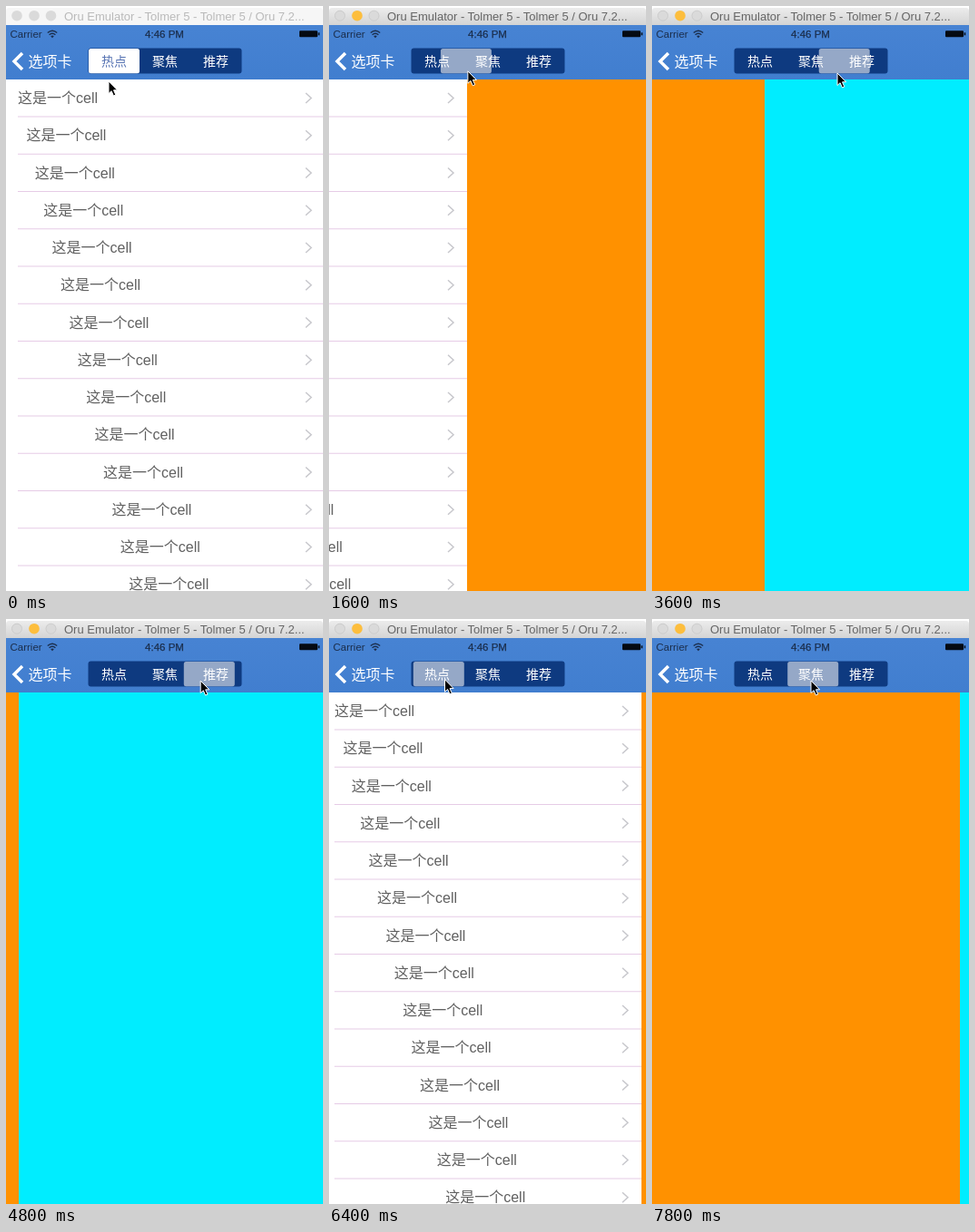
An HTML page that plays this animation: 349 px wide and 645 px high, repeating every 8000 ms.

```html
<!DOCTYPE html>
<html lang="zh-CN">
<head>
<meta charset="utf-8">
<title>选项卡</title>
<style>
  html, body { margin: 0; width: 100%; height: 100%; overflow: hidden; background: #fff; }
  svg { display: block; width: 349px; height: 645px; }
  text { font-family: "Liberation Sans", "Noto Sans CJK SC", "Noto Sans CJK", sans-serif; }
  .cell { font-size: 16px; fill: #616161; font-weight: 300; }
  .tab { font-size: 14px; font-weight: 500; fill: #fff; text-anchor: middle; }
  .title { font-size: 13px; fill: #666; }
  .status { font-size: 11.5px; fill: #1b2e4c; }
  .idle .active { display: none; }
  .idle .title { fill: #bababa; }
  .idle .tab.first { fill: #5a76b4; font-weight: 400; }
  .idle #thumb { fill-opacity: 1; }
</style>
</head>
<body>
<svg id="stage" viewBox="0 0 349 645">
  <defs>
    <linearGradient id="bar" x2="0" y2="1">
      <stop offset="0" stop-color="#ececec"/><stop offset="1" stop-color="#d4d4d4"/>
    </linearGradient>
    <linearGradient id="nav" x2="0" y2="1">
      <stop offset="0" stop-color="#4783d3"/><stop offset="1" stop-color="#417ecf"/>
    </linearGradient>
  </defs>

  <g id="pages">
    <rect y="81" width="351" height="564" fill="#fff"/>
    <g id="rows"></g>
    <rect x="351" y="81" width="351" height="564" fill="#ff9100"/>
    <rect x="702" y="81" width="351" height="564" fill="#00edff"/>
  </g>

  <rect width="349" height="21" fill="#fff"/>
  <path d="M0 21V6q0-4 4-4H345q4 0 4 4V21z" fill="#f6f6f6"/>
  <path class="active" d="M0 21V6q0-4 4-4H345q4 0 4 4V21z" fill="url(#bar)"/>
  <g fill="#dadada">
    <circle cx="12" cy="10.7" r="5.8"/>
    <circle cx="31" cy="10.7" r="5.8"/>
    <circle cx="49.5" cy="10.7" r="5.8"/>
  </g>
  <g class="active">
    <g fill="none" stroke="#c8c8c8" stroke-width=".8">
      <circle cx="12" cy="10.7" r="5.5"/><circle cx="49.5" cy="10.7" r="5.5"/>
    </g>
    <circle cx="31" cy="10.7" r="5.8" fill="#fdbe3d"/>
  </g>
  <text class="title" x="64" y="15.5">Oru Emulator - Tolmer 5 - Tolmer 5 / Oru 7.2...</text>

  <rect y="21" width="349" height="60" fill="url(#nav)"/>
  <text class="status" x="4.5" y="34.7">Carrier</text>
  <g fill="none" stroke="#1b2e4c" stroke-width="1.4">
    <path d="M45.8 29.5q5.2-4.6 10.4 0M47.6 31.7q3.4-3 6.8 0"/>
    <path d="M49.2 33.2L51 35.2 52.8 33.2Q51 31.8 49.2 33.2z" fill="#1b2e4c" stroke="none"/>
  </g>
  <text class="status" x="174.5" y="34.7" text-anchor="middle" stroke="#1b2e4c" stroke-width=".25">4:46 PM</text>
  <rect x="323" y="27.3" width="20" height="7" rx="1" fill="#050a12"/>
  <rect x="343.7" y="29.3" width="1.5" height="3" fill="#050a12"/>

  <path d="M18 52L9 61 18 70" fill="none" stroke="#fff" stroke-width="3.5"/>
  <text x="24.5" y="66.5" font-size="16" fill="#fff">选项卡</text>

  <rect x="90.5" y="46.5" width="169" height="28" rx="3" fill="#0e3a80"/>
  <rect id="thumb" y="47" width="56" height="27.3" rx="2.5" fill="#fff" fill-opacity=".56"/>
  <text class="tab first" x="119" y="66">热点</text>
  <text class="tab" x="175" y="66">聚焦</text>
  <text class="tab" x="231" y="66">推荐</text>

  <path id="cursor" d="M0 0V13.5L3.1 10.7 5.4 16 7.8 15 5.5 9.8H9.6z" fill="#000" stroke="#fff"/>
</svg>
<script>
const LOOP = 8000, STEP = 200;   // the picture updates five times a second
const PAGE = 351, TAB = 56.3;
const LEAD = 90;                 // ms by which the dragged thumb runs ahead of the page
const ROWS = 14, PITCH = 41.25, INDENT = 9.4;

// [time, scroll in px]: rests and turning points of the drag
const drag = [
  [1080, 0], [1600, 199], [1800, 199], [2890, 351], [3000, 462], [3600, 578],
  [3800, 578], [4400, 702], [4700, 702], [5873, 7], [6400, 7], [7800, 363]
];
// [time, cursor y]
const height = [[0, 83], [600, 71], [3600, 74], [5400, 66], [7800, 68]];

const $ = id => document.getElementById(id);
const clamp = p => Math.min(1, Math.max(0, p));
const ease = p => p * p * (3 - 2 * p);

// Each eased segment adds its own share of the travel.
function along(keys, t) {
  return keys.slice(1).reduce((v, [end, to], i) => {
    const [begin, from] = keys[i];
    return v + (to - from) * ease(clamp((t - begin) / (end - begin)));
  }, keys[0][1]);
}

function buildRows() {
  let out = '';
  for (let i = 0; i < ROWS; i++) {
    const y = 101.5 + PITCH * i;
    out += `<text class="cell" x="${13 + INDENT * i}" y="${y + 5.7}">这是一个cell</text>
      <path d="M330 ${y - 5.5}l6 5.5-6 5.5" fill="none" stroke="#c7c7cc" stroke-width="1.5"/>
      <rect x="13" y="${y + 20}" width="338" height="1" fill="#e6cbe6"/>`;
  }
  $('rows').innerHTML = out;
}

function draw(now) {
  const t = Math.floor(now % LOOP / STEP) * STEP;
  const page = along(drag, t), finger = along(drag, t + LEAD);
  const approach = 13 * (1 - ease(clamp(t / 600)));
  const x = 126 + finger * 0.135 - approach;
  $('stage').classList.toggle('idle', t < 400);
  $('pages').setAttribute('transform', `translate(${-Math.round(page)} 0)`);
  $('thumb').setAttribute('x', 91 + finger / PAGE * TAB);
  $('cursor').setAttribute('transform', `translate(${x} ${along(height, t)})`);
}

buildRows();
const start = performance.now();
function tick() {
  draw(performance.now() - start);
  requestAnimationFrame(tick);
}
tick();
</script>
</body>
</html>
```
